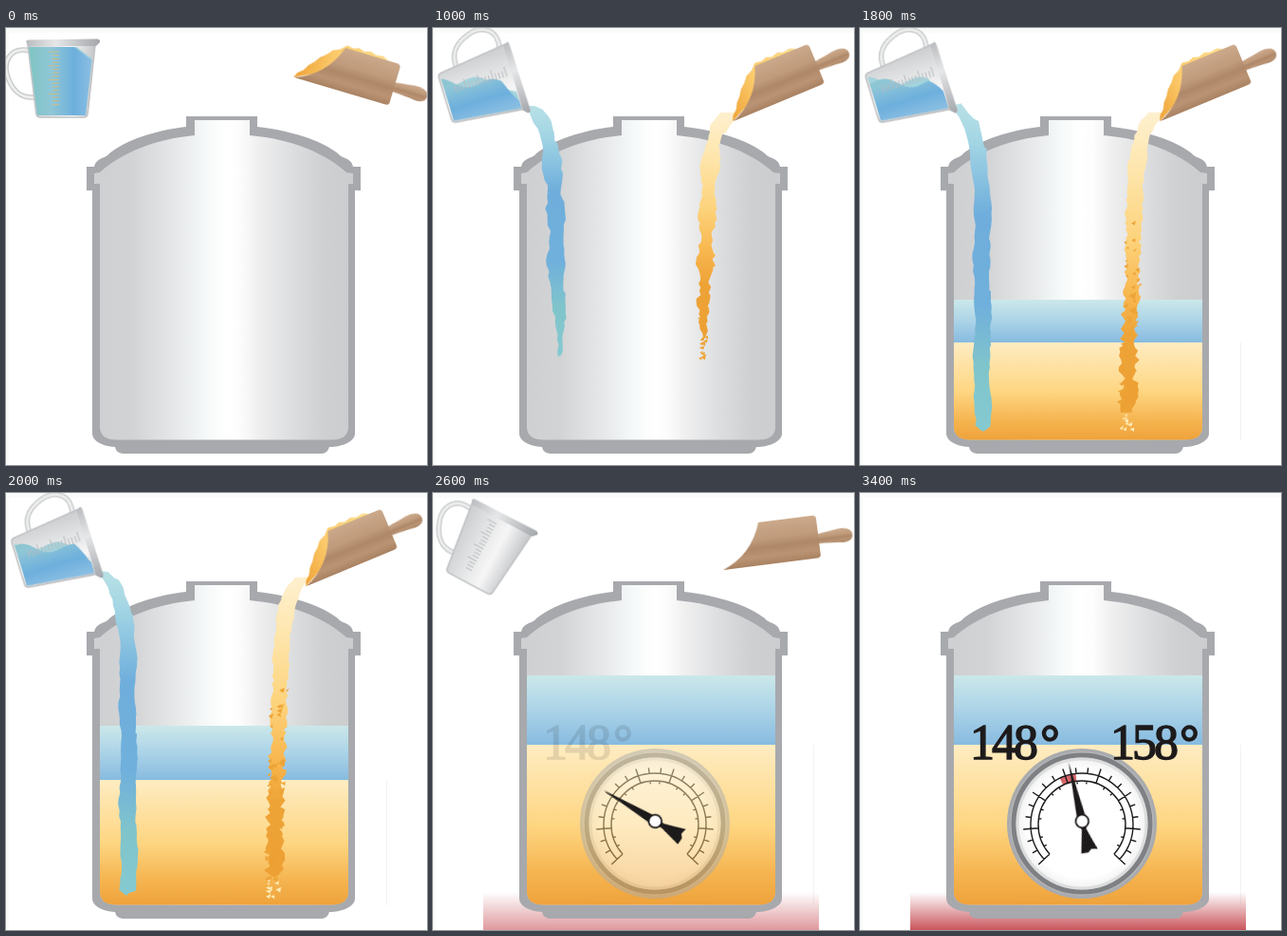
Animation of 444 by 460 pixels, one loop 8400 ms. Source, as an HTML page:

```html
<!DOCTYPE html>
<html lang="en">
<head>
<meta charset="utf-8">
<title>Mashing</title>
<style>
  html, body { margin: 0; width: 100%; height: 100%; overflow: hidden; background: #fff; }
  svg { display: block; width: 444px; height: 460px; }
  .num {
    font: 52px "Liberation Serif", serif; letter-spacing: -3px;
    fill: #1d1a1b; stroke: #1d1a1b; stroke-width: 1.4px;
  }
  .num tspan { font-weight: bold; }
  .malt, .water, .burner, .dial, .needle, .low, .high, .band, .tools {
    animation: 8400ms step-end infinite;
  }
  .malt { animation-name: malt; }
  .water { animation-name: water; }
  .burner { animation-name: burner; }
  .dial { animation-name: dial; }
  .needle { animation-name: needle; }
  .low { animation-name: low; }
  .high { animation-name: high; }
  .band { animation-name: band; }
  .tools { animation-name: tools; }

  @keyframes malt {
    0% { y: 434px; height: 0; }
    16.66% { y: 405px; height: 45px; }
    19.04% { y: 368px; height: 72px; }
    21.42% { y: 331px; height: 103px; }
    23.8% { y: 302px; height: 132px; }
    26.18% { y: 273px; height: 161px; }
    28.57%, 100% { y: 265px; height: 169px; }
  }
  @keyframes water {
    0% { y: 434px; height: 0; }
    16.66% { y: 390px; height: 15px; }
    19.04% { y: 338px; height: 30px; }
    21.42% { y: 286px; height: 45px; }
    23.8% { y: 245px; height: 57px; }
    26.18% { y: 204.5px; height: 68.5px; }
    28.57%, 100% { y: 192px; height: 73px; }
  }
  @keyframes burner {
    0% { opacity: 0; }
    30.95% { opacity: .6; }
    33.33%, 100% { opacity: 1; }
  }
  @keyframes dial {
    0% { opacity: 0; }
    30.95% { opacity: .5; }
    33.33% { opacity: .68; }
    35.71% { opacity: .84; }
    38.09%, 100% { opacity: 1; }
  }
  @keyframes needle {
    0% { opacity: 0; transform: rotate(-59deg); }
    30.95% { opacity: 1; transform: rotate(-59deg); }
    33.33% { opacity: 1; transform: rotate(-47.5deg); }
    35.71% { opacity: 1; transform: rotate(-36deg); }
    38.09% { opacity: 1; transform: rotate(-24.5deg); }
    40.47%, 100% { opacity: 1; transform: rotate(-13deg); }
  }
  @keyframes low {
    0% { opacity: 0; }
    30.95% { opacity: .12; }
    33.33% { opacity: .34; }
    35.71% { opacity: .56; }
    38.09% { opacity: .78; }
    40.47%, 100% { opacity: 1; }
  }
  @keyframes high {
    0% { opacity: 0; }
    35.71% { opacity: .33; }
    38.09% { opacity: .67; }
    40.47%, 100% { opacity: 1; }
  }
  @keyframes band {
    0% { opacity: 0; }
    38.09% { opacity: .5; }
    40.47%, 100% { opacity: 1; }
  }
  @keyframes tools {
    0% { opacity: 1; }
    35.71% { opacity: .67; }
    38.09% { opacity: .33; }
    40.47%, 100% { opacity: 0; }
  }
</style>
</head>
<body>
<svg viewBox="0 0 444 460">
  <defs>
    <linearGradient id="steel" gradientUnits="userSpaceOnUse" x1="99" x2="361" y1="0" y2="0">
      <stop offset="0" stop-color="#cfd0d2"/><stop offset=".13" stop-color="#d2d3d5"/>
      <stop offset=".3" stop-color="#e5e7e8"/><stop offset=".43" stop-color="#f6f9f9"/>
      <stop offset=".51" stop-color="#fff"/><stop offset=".56" stop-color="#fdfdfd"/>
      <stop offset=".64" stop-color="#efeff0"/><stop offset=".78" stop-color="#dcddde"/>
      <stop offset=".9" stop-color="#cfd0d2"/><stop offset="1" stop-color="#cccdcf"/>
    </linearGradient>
    <linearGradient id="waterFill" x2="0" y2="1">
      <stop offset="0" stop-color="#cbe8ea"/><stop offset=".5" stop-color="#abd3e7"/>
      <stop offset="1" stop-color="#87bbe0"/>
    </linearGradient>
    <linearGradient id="maltFill" x2="0" y2="1">
      <stop offset="0" stop-color="#feecc2"/><stop offset=".5" stop-color="#fed682"/>
      <stop offset=".8" stop-color="#f5b450"/><stop offset="1" stop-color="#efa23a"/>
    </linearGradient>
    <linearGradient id="heat" x2="0" y2="1">
      <stop offset="0" stop-color="#c9555c" stop-opacity="0"/>
      <stop offset="1" stop-color="#c9555c"/>
    </linearGradient>
    <linearGradient id="glass">
      <stop offset="0" stop-color="#cbcdcf"/><stop offset=".35" stop-color="#e3e4e5"/>
      <stop offset=".65" stop-color="#f6f6f6"/><stop offset="1" stop-color="#c3c5c8"/>
    </linearGradient>
    <linearGradient id="rim">
      <stop offset="0" stop-color="#b9bbbe"/><stop offset=".4" stop-color="#e6e7e8"/>
      <stop offset="1" stop-color="#a3a6aa"/>
    </linearGradient>
    <linearGradient id="cupFill" gradientUnits="userSpaceOnUse" x1="25" x2="92" y1="0" y2="0">
      <stop offset="0" stop-color="#80c4c3"/><stop offset=".35" stop-color="#8fc6d6"/>
      <stop offset=".7" stop-color="#6dafdd"/><stop offset="1" stop-color="#8dc0e3"/>
    </linearGradient>
    <linearGradient id="wood" x2="0" y2="1">
      <stop offset="0" stop-color="#cba98b"/><stop offset=".4" stop-color="#bf9a7b"/>
      <stop offset=".6" stop-color="#ad8768"/><stop offset=".8" stop-color="#ba9474"/>
      <stop offset="1" stop-color="#a98262"/>
    </linearGradient>
    <linearGradient id="heap">
      <stop offset="0" stop-color="#efa236"/><stop offset=".4" stop-color="#fbcb6c"/>
      <stop offset="1" stop-color="#fbdc8c"/>
    </linearGradient>
    <linearGradient id="jet" x2="0" y2="1">
      <stop offset="0" stop-color="#b9e1e6"/><stop offset=".12" stop-color="#a2d5e4"/>
      <stop offset=".34" stop-color="#6faedc"/><stop offset=".62" stop-color="#70b0dc"/>
      <stop offset=".8" stop-color="#80c4cb"/><stop offset="1" stop-color="#85cad0"/>
    </linearGradient>
    <linearGradient id="pour" x2="0" y2="1">
      <stop offset="0" stop-color="#fef0cf"/><stop offset=".2" stop-color="#fee5ab"/>
      <stop offset=".42" stop-color="#fdd37c"/><stop offset=".6" stop-color="#f8b850"/>
      <stop offset=".75" stop-color="#eea337"/><stop offset="1" stop-color="#eda033"/>
    </linearGradient>
    <radialGradient id="face">
      <stop offset=".85" stop-color="#fff"/><stop offset="1" stop-color="#f4f4f4"/>
    </radialGradient>
    <path id="inner" d="M199 97H257V113C302 117 337 132 359 152L366 153V164H361V421Q360 433.500 343 433.500H117Q100 433.500 99 421V164H93V153L99 152C121 132 156 117 199 113Z"/>
    <clipPath id="inTank"><use href="#inner"/></clipPath>
    <clipPath id="inCup"><path d="M24 20L33 92H84L92 20Z"/></clipPath>
    <path id="handle" fill="none" d="M26 24C4 19-4 36 2 52C7 66 15 74 30 73"/>
  </defs>

  <path d="M0 0H444V5H3V460H0Z" fill="#f8fbfa"/>
  <rect class="malt" x="401" width="1" fill="#f3f3f3"/>
  <rect class="burner" x="53" y="420" width="354" height="40" fill="url(#heat)"/>

  <path fill="#a7a9ad" d="M190 93H265V104C300 108 332 118 350 132Q352 135 358 137Q365 140 366 146H374V171H368V427C368 435 355 441 341 441Q339 448 333 448H123Q116 447 115 441C100 440 91 434 91 427V171H85V146H93Q94 140 101 137Q107 135 109 132C127 118 156 108 190 104Z"/>
  <use href="#inner" fill="url(#steel)"/>
  <g clip-path="url(#inTank)">
    <rect class="malt" x="98" width="264" fill="url(#maltFill)"/>
    <rect class="water" x="98" width="264" fill="url(#waterFill)"/>
  </g>

  <g id="streams">
    <path id="jetPath" fill="url(#jet)"/>
    <path id="pourPath" fill="url(#pour)"/>
    <path id="specks" fill="#eda437"/>
    <path id="crumbs"/>
  </g>

  <g class="tools">
    <g id="cup">
      <use href="#handle" stroke="#c6c8ca" stroke-width="5.500"/>
      <use href="#handle" stroke="#eceded" stroke-width="3"/>
      <path d="M23 18L32 91Q33 94 36 94H82Q85 94 86 91L94 18Z" fill="url(#glass)" stroke="#c0c2c5" stroke-width="1.600"/>
      <g clip-path="url(#inCup)">
        <path id="backWater" fill="#a3d3dc"/>
        <path id="frontWater" fill="url(#cupFill)"/>
      </g>
      <path id="marks" fill="none" stroke-width="1"/>
      <path d="M21 14Q22 12 25 12.500L96 11.500Q100 12 99 15L95 19H23Z" fill="url(#rim)"/>
    </g>
    <g id="scoop">
      <path id="grain" fill="url(#heap)" d="M-1 0L2-6 7-10 11-17 16-22 20-28 26-33 31-39 38-42 44-48 52-47 57-49 63-47 70-49 76-47 84-48 92-44 44-40 28-14Z"/>
      <path d="M103-25C113-26 122-28 130-28Q140-27 140-20Q140-13 130-13C121-14 113-15 103-15Z" fill="url(#wood)"/>
      <path d="M0 0Q32-12 43-45H100Q104-45 104-41V-3Q104 0 100 0Z" fill="url(#wood)"/>
    </g>
  </g>

  <g transform="translate(234 348)">
    <g class="dial">
      <circle r="79" fill="#a9abae"/>
      <circle r="75.500" fill="#bcbdbf"/>
      <circle r="72" fill="none" stroke="#7f8083" stroke-width="5"/>
      <circle r="69.500" fill="#dcdddd"/>
      <circle r="66.500" fill="url(#face)"/>
      <g transform="translate(0 1)">
        <path class="band" fill="none" stroke="#d8666b" stroke-width="8" d="M-21.500-45.200A50 50 0 0 1-6-49.600"/>
        <path id="scale" fill="none" stroke="#1d1a1b" stroke-width="1.400"/>
      </g>
    </g>
    <g transform="translate(.3 -2.500)">
      <g class="needle">
        <path fill="#1d1a1b" d="M0-64L4.500-6 2.500 9 6 21 9.500 32 3 30.500-1 33.500-8.500 33-5.500 21-2.500 9-4.500-6Z"/>
        <circle r="6.800" fill="#fff" stroke="#1d1a1b" stroke-width="1.800"/>
      </g>
    </g>
  </g>
  <text class="num low" x="116" y="280">148<tspan x="190">°</tspan></text>
  <text class="num high" x="264" y="280">158<tspan x="337">°</tspan></text>
</svg>

<script>
const LOOP = 8400, STEP = 200, LAST = 17;
const el = id => document.getElementById(id);
const rad = deg => deg * Math.PI / 180;
const fix = n => n.toFixed(1);
const poly = pts => 'M' + pts.map(p => fix(p[0]) + ' ' + fix(p[1])).join('L') + 'Z';

function random(seed) {
  let s = seed * 7919 + 17;
  return () => (s = (s * 16807 + 11) % 2147483647) / 2147483647;
}

// x, y, angle of each tool while tipping, pouring and coming back
const poses = {
  cup: { tip: [[59, 52, 0], [58, 55, 26], [56, 59, 50]], pour: [53, 62, 73], back: [57, 58, 28] },
  scoop: { tip: [[304, 52, 16.5], [307, 66, 4], [313, 82, -10]], pour: [317, 98, -22.5], back: [306, 81, -7.2] }
};
function poseAt(tool, k) {
  if (k < 3) return tool.tip[k];
  if (k < 13) return tool.pour;
  return k === 13 ? tool.back : tool.tip[0];
}

// Level water seen from inside the tilted cup
function cupWater(k, [cx, cy, deg], shift) {
  if (k > 12) return '';
  const level = k < 3 ? [20, 29, 41][k] : k === 12 ? 68 : 58;
  const cos = Math.cos(rad(deg)), sin = Math.sin(rad(deg));
  const pts = [[120, 130], [-20, 130]];
  for (let x = -20; x <= 120; x += 4) {
    const wave = k < 3 ? 0 : 4.5 * Math.sin(x / 8.75 + (k - 5) * 1.05 + 3.8 + shift);
    pts.push([x, level + wave - shift + Math.max(0, x - 72) * 0.75]);
  }
  return poly(pts.map(([x, y]) => {
    const dx = x - cx, dy = y - cy;
    return [59 + dx * cos + dy * sin, 52 - dx * sin + dy * cos];
  }));
}

// Closed ribbon around a centre line, with an uneven edge
function ribbon(top, end, gap, centre, half, rough, taper, rnd) {
  const left = [], right = [];
  for (let y = top; y <= end; y += gap) {
    const w = half(y) * Math.min(1, (end - y) / taper + 0.12);
    const r = rough(y);
    left.push([centre(y) - w + (rnd() - 0.5) * r, y]);
    right.unshift([centre(y) + w + (rnd() - 0.5) * r, y + (rnd() - 0.5) * gap]);
  }
  return poly(left.concat(right));
}

const jetX = y => 129 - 27 * Math.exp((82 - y) / 26);
const pourX = y => 289 - (y - 200) * 0.035 + 20 * Math.exp((90 - y) / 20);

function flecks(n, y0, y1, spread, size, rnd) {
  let d = '';
  for (let i = 0; i < n; i++) {
    const y = y0 + (y1 - y0) * rnd(), x = pourX(y) + (rnd() - 0.5) * spread;
    const a = rnd() * size + 1, b = rnd() * size + 1;
    d += poly([[x - a, y], [x + b, y - b], [x + a * 0.6, y + a]]);
  }
  return d;
}

function drawStreams(k) {
  const on = k >= 3 && k <= 12;
  el('streams').setAttribute('opacity', on ? (k === 12 ? 0.4 : k === 11 ? 0.82 : 1) : 0);
  if (!on) return;
  const rnd = random(k), early = k < 6, late = k > 10;
  const end = [169, 276, 350][k - 3] || (late ? 412 : 424);
  const phase = k * 1.7, slim = late ? 0.8 : 1;
  const lump = y => slim * (1 + (early ? 0.2 : 0.08) * Math.sin(y / 8 + phase));

  el('jetPath').setAttribute('d', ribbon(82, end, 6,
    y => jetX(y) + (early ? Math.max(0, y - 190) * 0.035 : 0) + Math.sin(y / 17 + phase) * Math.min(1, (y - 82) / 80),
    y => lump(y) * Math.min(8.5, 5 + (y - 82) / 5),
    () => early ? 2.5 : 1.6, early || late ? 95 : 7, rnd));

  const stop = early ? end - 18 : 408;
  el('pourPath').setAttribute('d', ribbon(89, stop, 4, pourX,
    y => lump(y) * (9 - Math.min(1.5, (y - 89) / 120)),
    y => 2 + Math.max(0, y - 170) * 0.028, early ? 75 : 12, rnd));
  el('specks').setAttribute('d',
    flecks(early ? 6 : 24, early ? end - 70 : 200, stop, early ? 12 : 19, 2, rnd) +
    (early ? '' : flecks(26, 280, stop, 17, 3.6, rnd)));
  el('crumbs').setAttribute('d', flecks(11, stop, stop + 17, early ? 5 : 13, 2, rnd));
  el('crumbs').setAttribute('fill', k > 7 ? '#fdeab4' : '#eda437');
}

function draw(k) {
  const cup = poseAt(poses.cup, k), scoop = poseAt(poses.scoop, k);
  el('cup').setAttribute('transform', `translate(${cup[0]} ${cup[1]}) rotate(${cup[2]}) translate(-59 -52)`);
  el('scoop').setAttribute('transform', `translate(${scoop[0]} ${scoop[1]}) rotate(${scoop[2]})`);
  el('backWater').setAttribute('d', cupWater(k, cup, 2));
  el('frontWater').setAttribute('d', cupWater(k, cup, 0));
  el('marks').setAttribute('stroke', k < 3 ? '#cdbd86' : '#b9bbbe');
  el('grain').setAttribute('opacity', k < 11 ? 1 : k < 13 ? 0.55 : 0);
  drawStreams(k);
}

function buildMarks() {
  let d = '';
  for (let i = 0; i < 16; i++) d += `M${i % 4 ? 49 : 45} ${25 + i * 3.7}H56`;
  el('marks').setAttribute('d', d);
}

function buildScale() {
  const sweep = 132.5, count = 21;
  const at = (r, deg) => fix(r * Math.sin(rad(deg))) + ' ' + fix(-r * Math.cos(rad(deg)));
  let d = '';
  for (const r of [54, 46]) d += `M${at(r, -sweep)}A${r} ${r} 0 1 1 ${at(r, sweep)}`;
  for (let i = 0; i <= count; i++) {
    const a = -sweep + i * 2 * sweep / count, long = i % 3 === 0;
    d += long ? `M${at(62, a)}L${at(46, a)}` : `M${at(60, a)}L${at(54, a)}M${at(46, a)}L${at(43, a)}`;
  }
  el('scale').setAttribute('d', d);
}

buildMarks();
buildScale();
draw(0);

let start, shown = 0;
function tick(now) {
  start ??= now;
  const k = Math.min(LAST, Math.floor(((now - start) % LOOP) / STEP + 0.001));
  if (k !== shown) draw(shown = k);
  requestAnimationFrame(tick);
}
requestAnimationFrame(tick);
</script>
</body>
</html>
```
